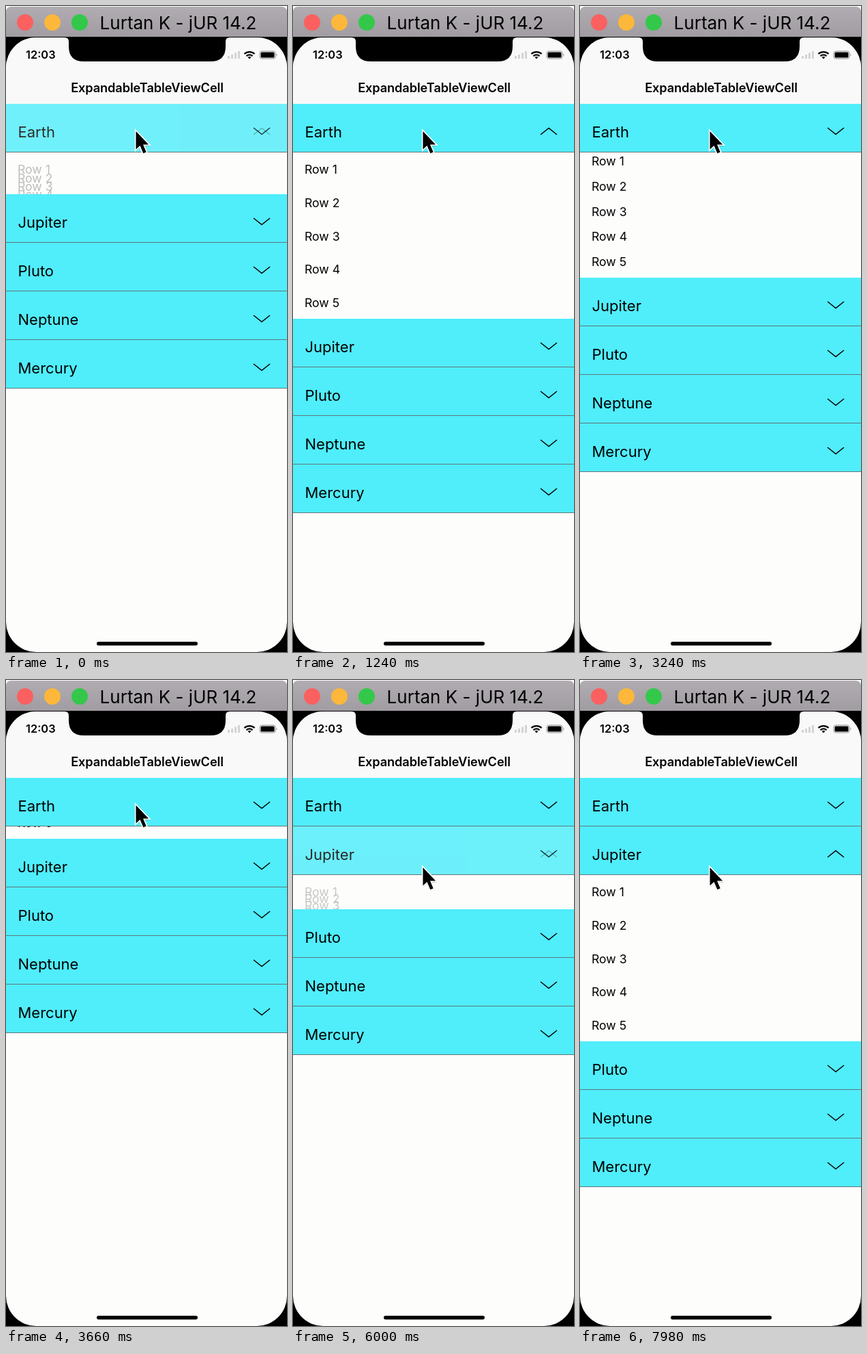
Animation of 412 by 944 pixels, one loop 8000 ms. Source, as an HTML page:

```html
<!DOCTYPE html>
<html lang="en">
<head>
<meta charset="utf-8">
<title>Expandable table</title>
<style>
  html, body { margin: 0; width: 100%; height: 100%; overflow: hidden; background: #fdfdfc; }
  svg { display: block; width: 100%; height: 100%; }
  text { font-family: Inter, "Liberation Sans", sans-serif; }
  .head { font-size: 22px; }
  .row { font-size: 17.6px; }
  .chevron { fill: none; stroke: #000; stroke-width: 1.5; }
</style>
</head>
<body>
<svg id="stage" viewBox="0 0 412 944" xmlns="http://www.w3.org/2000/svg">
  <defs>
    <linearGradient id="bar" x1="0" y1="0" x2="0" y2="1">
      <stop offset="0" stop-color="#b0acb1"/>
      <stop offset="1" stop-color="#a09ca1"/>
    </linearGradient>
    <clipPath id="gap"><rect id="gapBox" width="412"/></clipPath>
    <clipPath id="screen"><rect y="46" width="412" height="898" rx="44"/></clipPath>
  </defs>

  <rect y="40" width="412" height="904"/>
  <path d="M0 45V9Q0 1 8 1H404Q412 1 412 9V45Z" fill="url(#bar)"/>
  <circle cx="28" cy="24" r="12" fill="#fa6060"/>
  <circle cx="68" cy="24" r="12" fill="#fdb73a"/>
  <circle cx="108" cy="24" r="12" fill="#33c84a"/>
  <text x="252.5" y="34" font-size="26" text-anchor="middle">Lurtan K - jUR 14.2</text>

  <g clip-path="url(#screen)">
    <rect y="46" width="412" height="898" fill="#fdfdfc"/>
    <rect y="46" width="412" height="97" fill="#f9f9f9"/>
    <g id="table"></g>
  </g>

  <path d="M86 46Q92 46 92 52V59Q92 81 114 81H300Q322 81 322 59V52Q322 46 328 46Z"/>
  <text x="29" y="77" font-size="16.4" font-weight="600">12:03</text>
  <path d="M325 73h3v4h-3zM330 71h3v6h-3zM335 68.500h3v8.500h-3zM340 66h3v11h-3z" fill="#d3d3d2"/>
  <g fill="none" stroke="#000" stroke-width="2.300">
    <path d="M349.500 70A11 11 0 0 1 364.500 70"/>
    <path d="M352.500 73.200A6.500 6.500 0 0 1 361.500 73.200"/>
  </g>
  <path d="M354.500 74.800Q357 73 359.500 74.800L357 77.500Z"/>
  <rect x="372" y="66" width="23" height="11" rx="3" fill="none" stroke="#8f8f90"/>
  <rect x="373.500" y="67.500" width="20" height="8" rx="1.600"/>
  <path d="M396.500 69.500q2 2 0 4z" fill="#8f8f90"/>
  <text x="207" y="126" font-size="18.2" font-weight="600" letter-spacing="-.1" text-anchor="middle">ExpandableTableViewCell</text>
  <rect x="133" y="929" width="148" height="5.500" rx="2.700"/>

  <g id="cursor">
    <path d="M1 3V30L7.500 24L12 35L17 33L12.500 23H21Z" fill="#000" opacity=".18"/>
    <path d="M.5 1V27.500L6.500 22L11.300 33.300L15.700 31.500L11 20.500H19.200Z" stroke="#fff" stroke-width="3.200" paint-order="stroke"/>
  </g>
</svg>
<script>
const LOOP = 8000, OPEN_MS = 905;
const TOP = 143, PITCH = 70.8, FULL = 243.4, ROWS = 5;
const EARTH_OPEN = -314, EARTH_CLOSE = 2930, JUPITER_OPEN = 5716;
const CURSOR_FROM = 3900, CURSOR_MS = 400;

const $ = id => document.getElementById(id);
const set = (node, attrs) => {
  for (const key in attrs) node.setAttribute(key, attrs[key]);
  return node;
};
function add(parent, tag, attrs, label = '') {
  const node = set(document.createElementNS('http://www.w3.org/2000/svg', tag), attrs);
  node.textContent = label;
  return parent.appendChild(node);
}

// cubic-bezier(.42, 0, .58, 1)
function ease(x) {
  if (x <= 0) return 0;
  if (x >= 1) return 1;
  let lo = 0, hi = 1;
  for (let i = 0; i < 24; i++) {
    const s = (lo + hi) / 2, r = 1 - s;
    if (1.26 * r * r * s + 1.74 * r * s * s + s * s * s < x) lo = s; else hi = s;
  }
  return lo * lo * (3 - 2 * lo);
}
const progress = (t, start, span = OPEN_MS) => ease((t - start) / span);

const table = $('table');
const rowLayer = add(table, 'g', { 'clip-path': 'url(#gap)' });
const rows = Array.from({ length: ROWS }, (_, i) =>
  add(rowLayer, 'text', { x: 17, class: 'row' }, `Row ${i + 1}`));

function makeCell(name) {
  const group = add(table, 'g', {});
  const body = add(group, 'g', {});
  add(body, 'rect', { width: 412, height: 71, fill: '#50edfb' });
  add(body, 'text', { x: 17.5, y: 49, class: 'head' }, name);
  add(group, 'rect', { y: 70, width: 412, height: 1, fill: '#5f777c' });
  const down = add(group, 'path', { d: 'M363 35L375 44.500L387 35', class: 'chevron' });
  const up = add(group, 'path', { d: 'M363 45L375 35.500L387 45', class: 'chevron' });
  return { group, body, down, up };
}

// Built bottom-up so each separator stays above the next cell
const cells = ['Mercury', 'Neptune', 'Pluto', 'Jupiter', 'Earth'].map(makeCell).reverse();

// Which cell is open, how far, and how visible its new content is
function tableState(t) {
  if (t < EARTH_CLOSE) {
    const p = progress(t, EARTH_OPEN);
    return { index: 0, size: p, fade: p, flipped: p };
  }
  if (t < JUPITER_OPEN) {
    return { index: 0, size: 1 - progress(t, EARTH_CLOSE), fade: 1, flipped: 0, closing: true };
  }
  const p = progress(t, JUPITER_OPEN);
  return { index: 1, size: p, fade: p, flipped: p };
}

function draw(t) {
  const { index, size, fade, flipped, closing } = tableState(t);
  const gap = FULL * size, step = gap / ROWS;

  cells.forEach((cell, i) => {
    const y = Math.round(TOP + PITCH * i + (i > index ? gap : 0));
    const turn = i === index ? flipped : 0;
    set(cell.group, { transform: `translate(0 ${y})` });
    set(cell.body, { opacity: 1 - turn * (1 - turn) });
    set(cell.down, { opacity: 1 - turn });
    set(cell.up, { opacity: turn });
  });

  const edge = TOP + PITCH * (index + 1);
  set($('gapBox'), { y: edge, height: gap });
  const lift = closing ? FULL / ROWS - step : 0;
  rows.forEach((row, i) => set(row, { y: edge + 31.6 - lift + step * i }));
  set(rowLayer, { opacity: fade });

  const cursorY = 182 + 91 * progress(t, CURSOR_FROM, CURSOR_MS);
  set($('cursor'), { transform: `translate(190 ${cursorY})` });
}

const begin = performance.now();
function tick() {
  draw((performance.now() - begin) % LOOP);
  requestAnimationFrame(tick);
}
tick();
</script>
</body>
</html>
```
